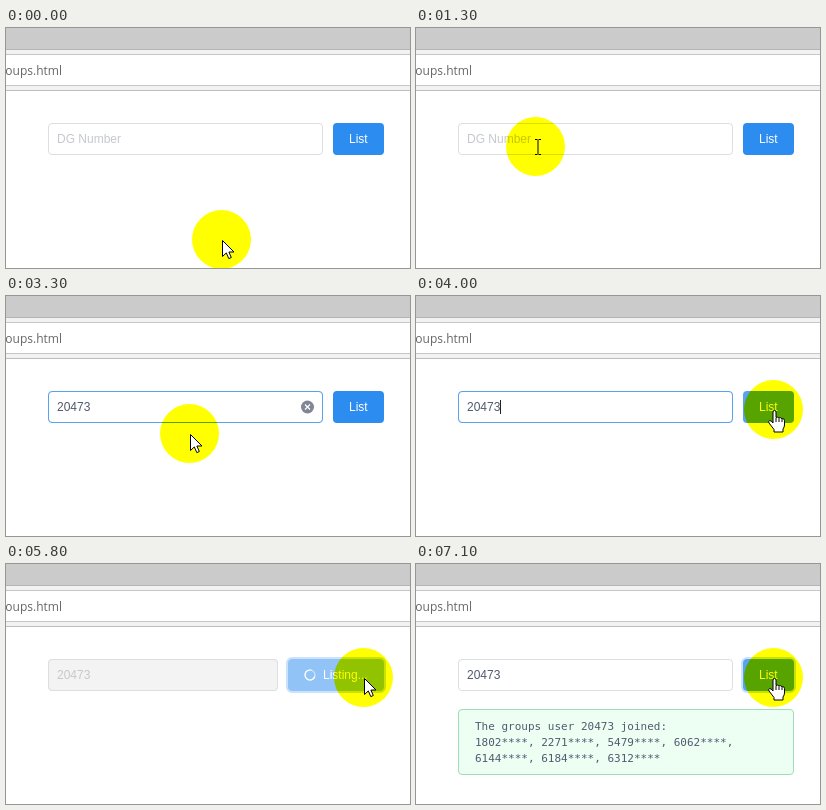
An HTML page for the animation above (7800 ms loop, 404 by 240 pixels).

```html
<!DOCTYPE html>
<html lang="en">
<head>
<meta charset="utf-8">
<title>Group lookup</title>
<style>
  html, body { margin: 0; width: 100%; height: 100%; overflow: hidden; background: #fff; }
  svg { display: block; width: 100%; height: 100%; }
  text { white-space: pre; }
  .ui { font: 12px "Liberation Sans", Arial, sans-serif; }
  .url { font: 12px "Open Sans", sans-serif; fill: #666; }
  .mono { font: 11px "DejaVu Sans Mono", monospace; fill: #515a6e; }
  #halo { mix-blend-mode: multiply; }
</style>
</head>
<body>
<svg viewBox="0 0 404 240">
  <rect width="404" height="240" fill="#fff"/>

  <!-- browser chrome -->
  <rect width="404" height="22" fill="#cbcbcb"/>
  <rect y="21" width="404" height="1" fill="#b4b4b4"/>
  <rect y="22" width="404" height="40" fill="#f2f2f2"/>
  <rect x="-2" y="26.5" width="408" height="31" fill="#fff" stroke="#c6c6c6"/>
  <rect y="62" width="404" height="1" fill="#bdbdbd"/>
  <text class="url" x="56" y="47" text-anchor="end">oups.html</text>

  <!-- input -->
  <g fill="none">
    <rect class="box" x="42.5" y="95.5" height="31" rx="3.5" fill="#fff" stroke="#dcdee2"/>
    <rect class="box" id="disabled" x="42.5" y="95.5" height="31" rx="3.5" fill="#f3f3f3" stroke="#dcdee2"/>
    <rect class="box" id="active" x="42.5" y="95.5" height="31" rx="3.5" stroke="#57a3f3"/>
  </g>
  <text class="ui" id="value" x="51" y="115"></text>
  <rect id="caret" y="104" width="1" height="14" fill="#222"/>
  <g id="clear">
    <circle cx="301.5" cy="111" r="6.5" fill="#808695"/>
    <path d="M299 108.500l5 5m0-5l-5 5" stroke="#fff" stroke-width="1.2"/>
  </g>

  <!-- button -->
  <rect id="glow" y="94" height="34" rx="5" fill="none" stroke="#2d8cf0" stroke-opacity=".25" stroke-width="2"/>
  <rect id="button" y="95" height="32" rx="4"/>
  <text class="ui" id="label" y="115" fill="#fff"></text>
  <g id="spinner" fill="none" stroke="#fff" stroke-width="1.2">
    <circle r="5" stroke-opacity=".55"/>
    <path d="M0-5A5 5 0 1 1-5 0"/>
  </g>

  <!-- result -->
  <g id="result">
    <rect x="42.5" y="145.500" width="335" height="65" rx="3.5" fill="#edfff3" stroke="#9fdcba"/>
    <text class="mono" x="59" y="166" id="heading"></text>
    <text class="mono" x="59" y="182">1802****, 2271****, 5479****, 6062****,</text>
    <text class="mono" x="59" y="198">6144****, 6184****, 6312****</text>
  </g>

  <!-- pointer -->
  <circle id="halo" r="29.5" fill="#ffff00"/>
  <g id="pointer" stroke-linejoin="round">
    <path id="arrow" d="M.5.5V16.500L4.300 12.900L6.800 18.600L9.300 17.500L6.900 12H12Z" fill="#fff" stroke="#000"/>
    <path id="beam" d="M-1-7.500H1.500M2.500-7.500H5M2-7V7M-1 7.500H1.500M2.500 7.500H5" fill="none" stroke="#000"/>
    <path id="hand" d="M-1 12V2Q-1 .5.5.5T2 2V7.500Q3.500 6.500 5 8Q6.500 7 8 8.700Q10.500 8.200 10.500 10.500V15Q10.500 17 9 19V22H0V19.500L-5 13Q-6 11-4.300 10.500Q-3 10.500-1 13Z M2 8V12M5 8.500V12M8 9.200V12" fill="#fff" stroke="#000"/>
  </g>
</svg>
<script>
const LOOP = 7800, STEP = 100;
const HOVER = 1300, FOCUS = 1800, TYPE = 2500, TYPED = 2800, CLICK = 4500, DONE = 6400;
const USER = "20473", HINT = "DG Number";

// time, x, y
const path = [
  [600, 215.5, 211.5], [800, 191, 187], [1100, 134, 132], [1300, 119.5, 118.5],
  [1500, 118.5, 113], [2100, 118.5, 115.5], [3000, 118.5, 115], [3200, 116, 113],
  [3300, 183.5, 137.5], [3500, 250, 153], [3700, 326, 140], [3850, 362, 120], [4000, 357.5, 113.5]
];

const $ = id => document.getElementById(id);
const boxes = document.querySelectorAll(".box");
const set = (id, attrs) => {
  for (const k in attrs) $(id).setAttribute(k, attrs[k]);
};
const show = (id, on) => set(id, { opacity: +on });
const ramp = (t, a, b) => Math.min(1, Math.max(0, (t - a) / (b - a)));

function pointerAt(t) {
  const i = path.findIndex(p => p[0] > t);
  if (i === 0) return path[0].slice(1);
  if (i < 0) return path[path.length - 1].slice(1);
  const [t0, x0, y0] = path[i - 1], [t1, x1, y1] = path[i];
  const k = ramp(t, t0, t1);
  return [x0 + (x1 - x0) * k, y0 + (y1 - y0) * k];
}

function drawInput(t, busy) {
  for (const b of boxes) b.setAttribute("width", busy ? 229 : 274);
  show("active", ramp(t, HOVER, HOVER + 200) * (1 - ramp(t, CLICK, CLICK + 200)));
  show("disabled", ramp(t, CLICK - 100, CLICK + 200) * (1 - ramp(t, DONE, DONE + 200)));

  const count = t < TYPE ? 0 : Math.min(USER.length, 1 + Math.floor((t - TYPE) / 75));
  $("value").textContent = count ? USER.slice(0, count) : HINT;
  set("value", { fill: !count ? "#c5c8ce" : busy ? "#c8c8c8" : "#515a6e" });

  const typing = t >= TYPE && t < TYPED;
  const blink = Math.floor((t - (t < TYPE ? FOCUS : TYPED)) / 500) % 2 === 0;
  set("caret", { x: count ? 51 + Math.round(count * 6.67) : 51 });
  show("caret", t >= FOCUS && t < CLICK && (typing || blink));
  show("clear", t >= TYPE && t < 3400);
}

function drawButton(t, busy, hover) {
  const x = busy ? 282 : 327, width = 378 - x;
  set("button", { x, width, fill: busy ? "#92c3f7" : hover ? "#57a3f3" : "#2d8cf0" });
  set("glow", { x: x - 1, width: width + 2 });
  show("glow", t >= CLICK);
  set("label", { x: busy ? 317 : 343 });
  $("label").textContent = busy ? "Listing..." : "List";
  set("spinner", { transform: `translate(304 111) rotate(${(t - CLICK) * 0.36})` });
  show("spinner", busy);
}

function drawPointer(x, y, kind) {
  set("halo", { cx: x, cy: y });
  set("pointer", { transform: `translate(${Math.round(x)} ${Math.round(y)})` });
  for (const id of ["arrow", "beam", "hand"]) show(id, id === kind);
}

function render(t) {
  const busy = t >= CLICK && t < DONE;
  const [x, y] = pointerAt(t);
  const inRow = y > 95 && y < 127;
  const onInput = inRow && x > 42 && x < 317;
  const onButton = inRow && x > 327 && x < 378;
  drawInput(t, busy);
  drawButton(t, busy, onButton);
  show("result", ramp(t, DONE - 100, DONE + 300));
  drawPointer(x, y, onInput ? "beam" : onButton && !busy ? "hand" : "arrow");
}

$("heading").textContent = `The groups user ${USER} joined:`;
const start = performance.now();
function tick() {
  const t = (performance.now() - start) % LOOP;
  render(Math.floor(t / STEP) * STEP);
  requestAnimationFrame(tick);
}
tick();
</script>
</body>
</html>
```
